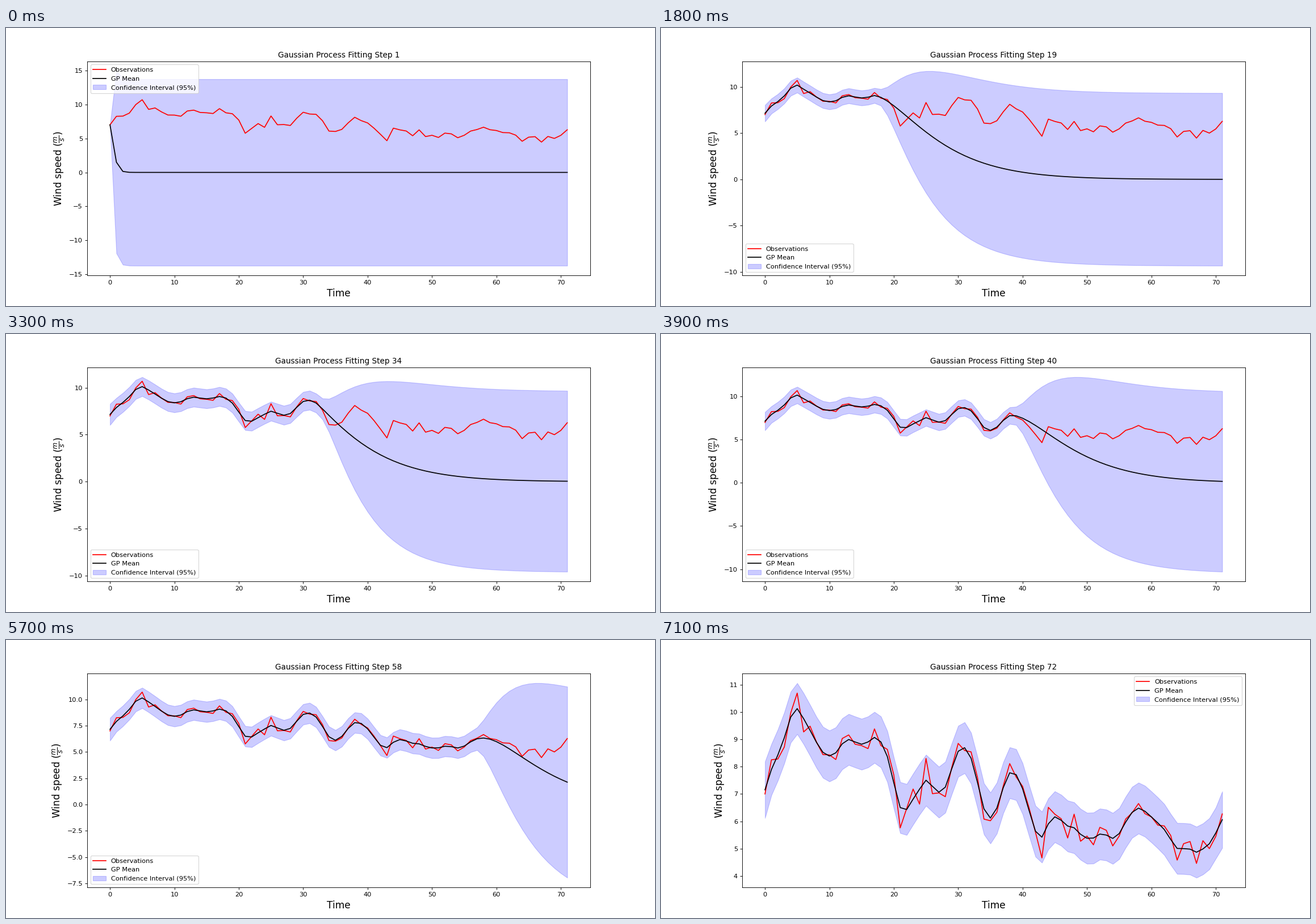
A matplotlib script for the animation above (7200 ms loop, 1143 px wide and 490 px high).

```python
import numpy as np
import matplotlib.pyplot as plt
from matplotlib.animation import FuncAnimation

DPI = 1143 / 14
WIND = np.array([
    7.0, 8.25, 8.28, 8.72, 9.97, 10.69, 9.27, 9.48, 8.9, 8.44, 8.43, 8.26,
    9.03, 9.16, 8.82, 8.77, 8.66, 9.38, 8.77, 8.63, 7.7, 5.76, 6.47, 7.18,
    6.63, 8.3, 7.01, 7.04, 6.9, 7.97, 8.85, 8.59, 8.54, 7.6, 6.08, 6.02,
    6.33, 7.3, 8.11, 7.62, 7.28, 6.5, 5.6, 4.66, 6.51, 6.26, 6.09, 5.39,
    6.26, 5.27, 5.46, 5.14, 5.78, 5.67, 5.1, 5.46, 6.08, 6.31, 6.65, 6.28,
    6.16, 5.86, 5.83, 5.48, 4.58, 5.18, 5.26, 4.46, 5.29, 5.0, 5.45, 6.27])
N = len(WIND)
TIME = np.arange(N)
SCALES = np.geomspace(1, 10, 11)
RATIOS = np.geomspace(1e-6, 1, 600)
LOCS = ["upper right", "upper left", "lower left", "lower right", "right",
        "center left", "center right", "lower center", "upper center", "center"]


def matern(a, b, scale):
    d = np.sqrt(3) * np.abs(a[:, None] - b[None, :]) / scale
    return (1 + d) * np.exp(-d)


def fit(n):
    """Most likely length scale, noise-to-signal ratio and signal variance."""
    y = WIND[:n]
    if n == 1:
        return 0.597, 1e-8, y[0] ** 2
    best = (np.inf,)
    for scale in SCALES:
        lam, vec = np.linalg.eigh(matern(TIME[:n], TIME[:n], scale))
        eig = np.maximum(lam, 0)[:, None] + RATIOS
        var = ((vec.T @ y)[:, None] ** 2 / eig).mean(axis=0)
        cost = n * np.log(var) + np.log(eig).sum(axis=0)
        i = cost.argmin()
        if cost[i] < best[0]:
            best = (cost[i], scale, RATIOS[i], var[i])
    return best[1:]


def predict(n):
    scale, ratio, var = fit(n)
    seen = TIME[:n]
    cov = matern(seen, seen, scale) + ratio * np.eye(n)
    cross = matern(TIME, seen, scale)
    gain = np.linalg.solve(cov, cross.T).T
    left = 1 + ratio - (gain * cross).sum(axis=1)
    return gain @ WIND[:n], 1.96 * np.sqrt(var * np.maximum(left, 0))


def place_legend(lines, band):
    """Put the legend where it covers the least of the lines and the band."""
    legend = ax.legend(loc=LOCS[0])
    ax.get_xlim(), ax.get_ylim()
    paths = [line.get_path() for line in lines] + band.get_paths()
    paths = [ax.transData.transform_path(p) for p in paths]

    def badness(loc):
        legend.set_loc(loc)
        box = legend.get_window_extent(fig.canvas.get_renderer())
        return sum(box.count_contains(p.vertices)
                   + int(p.intersects_bbox(box, filled=False)) for p in paths)

    legend.set_loc(min(LOCS, key=badness))


fig, ax = plt.subplots(figsize=(14, 490 / DPI), dpi=DPI)


def draw(i):
    mean, half = predict(i + 1)
    ax.clear()
    obs, = ax.plot(TIME, WIND, color="red", label="Observations")
    fitted, = ax.plot(TIME, mean, color="black", label="GP Mean")
    band = ax.fill_between(TIME, mean - half, mean + half, color="blue",
                           alpha=0.2, label="Confidence Interval (95%)")
    ax.set_title(f"Gaussian Process Fitting Step {i + 1}")
    ax.set_xlabel("Time", fontsize=15)
    ax.set_ylabel(r"Wind speed ($\frac{m}{s}$)", fontsize=15)
    place_legend([obs, fitted], band)
    return ax.get_children()


anim = FuncAnimation(fig, draw, frames=N, interval=100, repeat=True)
plt.show()
```
